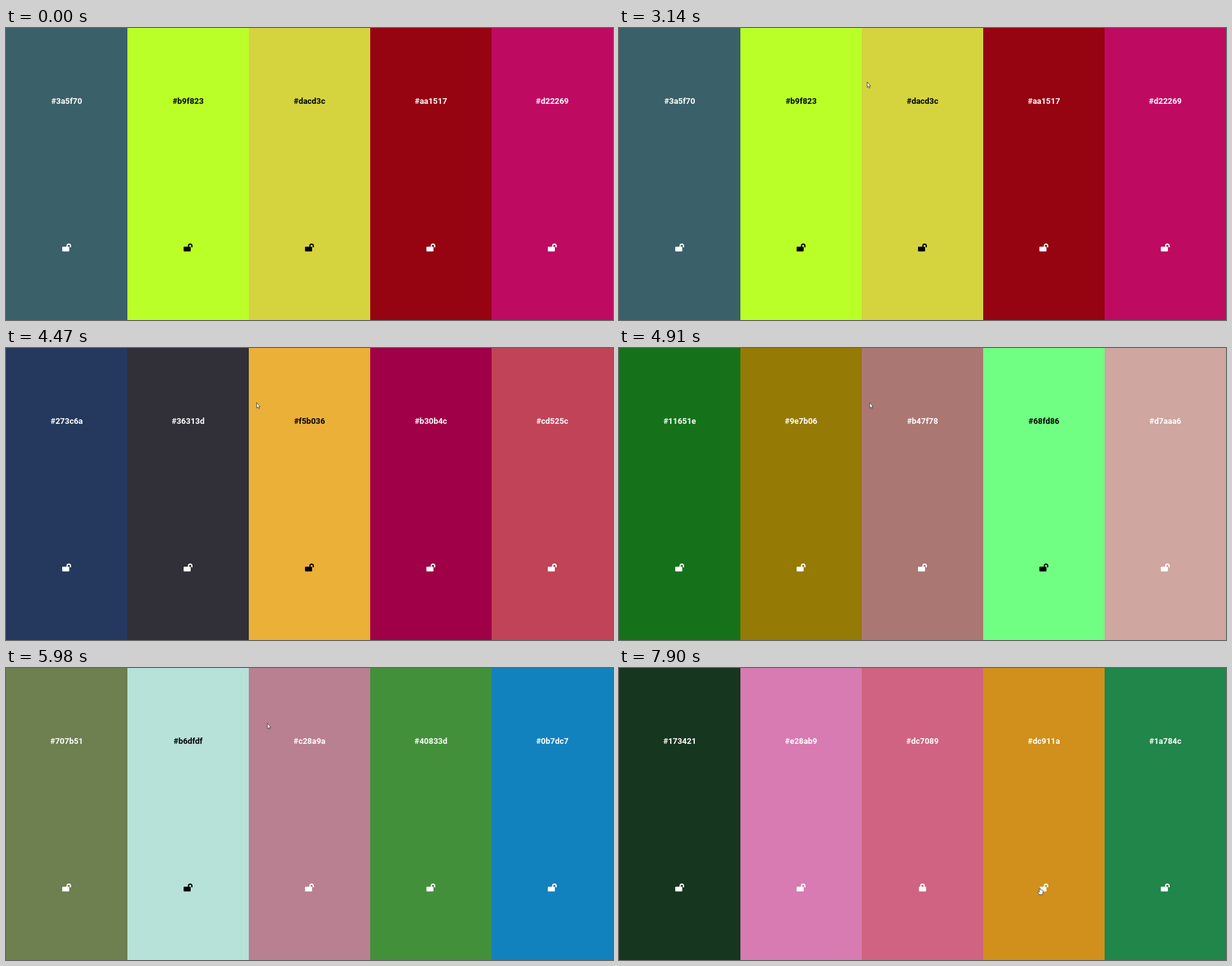
Recreate the animation shown at these times as an HTML page. Size 960 by 462 pixels, loop 8000 ms.

```html
<!DOCTYPE html>
<html lang="en">
<head>
<meta charset="utf-8">
<title>Colour palettes</title>
<style>
  html, body { margin: 0; width: 100%; height: 100%; overflow: hidden; }
  svg { display: block; width: 100vw; height: 100vh; }
  text { font: 700 12.9px Roboto, sans-serif; text-anchor: middle; }
</style>
</head>
<body>
<svg id="stage" viewBox="0 0 960 462" preserveAspectRatio="none"></svg>
<script>
const LOOP = 8000, LOCK_TIME = 7250, COLUMN = 192;

// One label and fill per column; `dark` lists the columns with black ink.
const palettes = [
  { from: 0, dark: [1, 2],
    labels: '3a5f70 b9f823 dacd3c aa1517 d22269',
    fills: '3a606a bbff28 d5d43e 960311 bf0a62' },
  { from: 3400, dark: [2],
    labels: '273c6a 36313d f5b036 b30b4c cd525c',
    fills: '25395f 312f37 ebb038 a00047 c14358' },
  { from: 4600, dark: [3],
    labels: '11651e 9e7b06 b47f78 68fd86 d7aaa6',
    fills: '15721a 957b05 ab7772 70ff83 cfa6a0' },
  { from: 5440, dark: [1],
    labels: '707b51 b6dfdf c28a9a 40833d 0b7dc7',
    fills: '6e7f50 b7e2d9 b98092 43903b 1282bf' },
  { from: 6250, dark: [],
    labels: '173421 e28ab9 dc7089 dc911a 1a784c',
    fills: '16361f d87bb2 d06381 d0901b 208649' }
].map(p => ({ ...p, labels: p.labels.split(' '), fills: p.fills.split(' ') }));

// Cursor stops: time, x, y
const route = [
  [460, 500, 464], [990, 489, 32], [1190, 489, 32], [1900, 483, 80],
  [2010, 483, 80], [2540, 392, 85], [3840, 392, 85], [4470, 396, 86],
  [4910, 396, 86], [5700, 413, 87], [6150, 413, 87], [6400, 435, 184],
  [6950, 477, 347], [7400, 477, 347], [7880, 666, 347]
];

const stage = document.getElementById('stage');

function add(parent, tag, attrs = {}) {
  const node = document.createElementNS('http://www.w3.org/2000/svg', tag);
  for (const key in attrs) node.setAttribute(key, attrs[key]);
  return parent.appendChild(node);
}

const show = (node, on) => node.setAttribute('display', on ? 'inline' : 'none');

function makeLock(parent, left, shackleX) {
  const lock = add(parent, 'g');
  add(lock, 'rect', { x: left, y: 345.9, width: 11.2, height: 7.5, rx: 1.2, stroke: 'none' });
  add(lock, 'path', {
    d: `M${shackleX} 347v-2.3a2.7 2.7 0 0 1 5.4 0v2.3`, fill: 'none', 'stroke-width': 1.9
  });
  return lock;
}

const columns = Array.from({ length: 5 }, (_, i) => {
  const x = i * COLUMN, mid = x + COLUMN / 2;
  return {
    panel: add(stage, 'rect', { x, y: 0, width: COLUMN, height: 462 }),
    ink: add(stage, 'g'),
    mid
  };
});
for (const c of columns) {
  c.label = add(c.ink, 'text', { x: c.mid, y: 119.5, stroke: 'none' });
  c.open = makeLock(c.ink, c.mid - 7.1, c.mid + 0.6);
  c.closed = makeLock(c.ink, c.mid - 5.6, c.mid - 2.7);
}

const cursor = add(stage, 'g', { stroke: '#333', 'stroke-width': 0.8, fill: '#fff' });
const arrow = add(cursor, 'path', { d: 'M.4.4V9L2.2 7.4 3.5 10.2 4.8 9.6 3.5 6.9H6Z' });
const hand = add(cursor, 'path', {
  d: 'M-1.3 1Q-.5-.2.2 1V4Q1 3.3 1.8 4.2 2.6 3.6 3.3 4.6 4.4 4.2 4.6 5.5V8.3L3.5 11.7H-1.3L-3.8 7.5Q-3.7 6.2-2.3 6.8L-1.3 7.8Z'
});

function cursorAt(t) {
  const next = route.findIndex(stop => stop[0] > t);
  if (next < 0) return route[route.length - 1].slice(1);
  const [t0, x0, y0] = route[next - 1], [t1, x1, y1] = route[next];
  const u = (t - t0) / (t1 - t0), ease = u * u * (3 - 2 * u);
  return [x0 + (x1 - x0) * ease, y0 + (y1 - y0) * ease];
}

function render(t) {
  const palette = palettes.findLast(p => t >= p.from);
  columns.forEach((c, i) => {
    const color = palette.dark.includes(i) ? '#000' : '#fff';
    const locked = i === 2 && t >= LOCK_TIME;
    c.panel.setAttribute('fill', '#' + palette.fills[i]);
    c.ink.setAttribute('fill', color);
    c.ink.setAttribute('stroke', color);
    c.label.textContent = '#' + palette.labels[i];
    show(c.open, !locked);
    show(c.closed, locked);
  });

  const visible = t >= route[0][0];
  show(cursor, visible);
  if (!visible) return;
  const [x, y] = cursorAt(t);
  const overLock = y > 338 && y < 356 && Math.abs(x % COLUMN - 96) < 10;
  cursor.setAttribute('transform', `translate(${x} ${y})`);
  show(arrow, !overLock);
  show(hand, overLock);
}

const start = performance.now();
function tick() {
  render((performance.now() - start) % LOOP);
  requestAnimationFrame(tick);
}
render(0);
requestAnimationFrame(tick);
</script>
</body>
</html>
```
